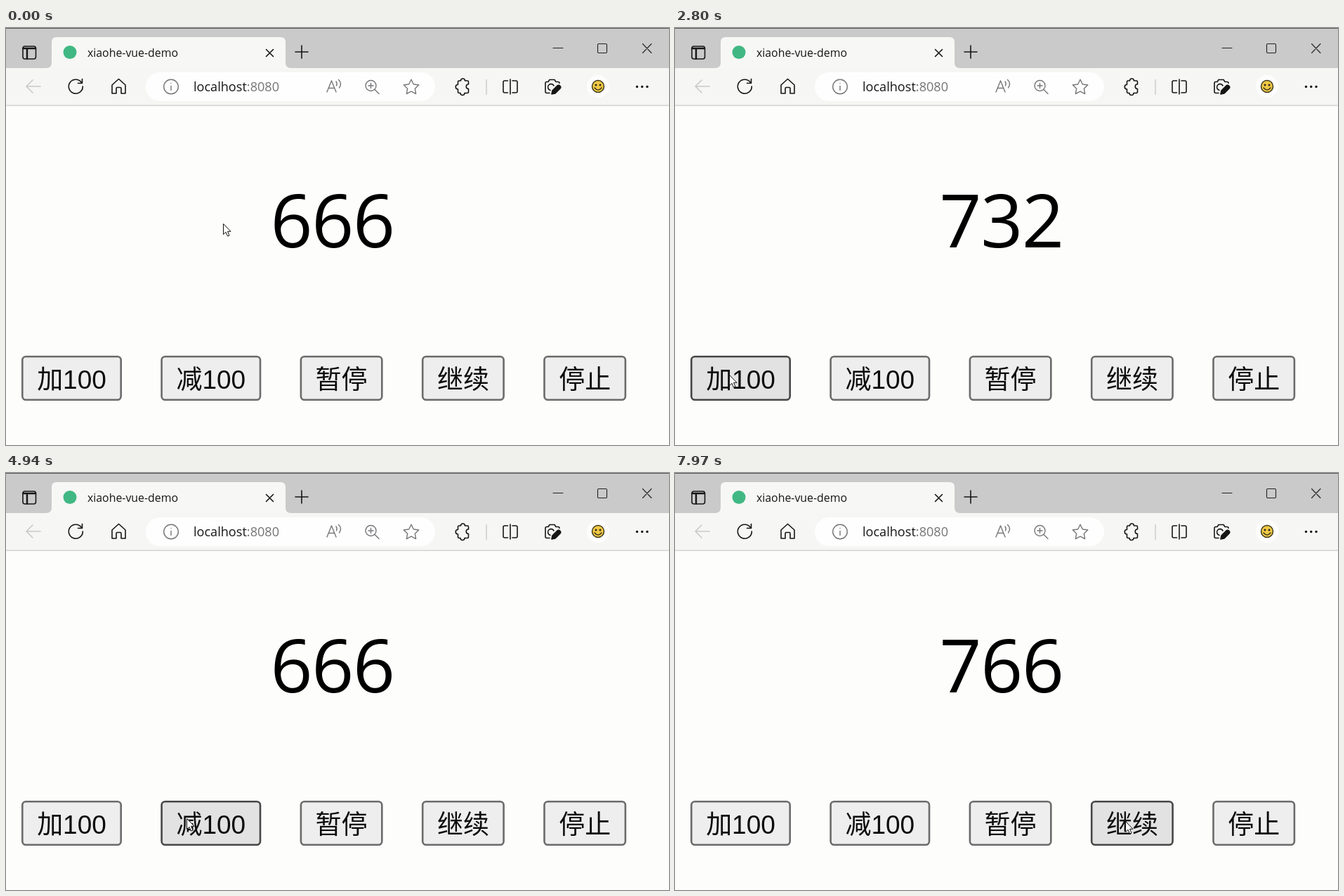
An HTML page that plays this animation: 944x593 px, repeating every 8 s.

```html
<!DOCTYPE html>
<html lang="zh">
<head>
<meta charset="utf-8">
<title>xiaohe-vue-demo</title>
<style>
  html, body { margin: 0; width: 100%; height: 100%; overflow: hidden; background: #fdfdfc; }
  svg { display: block; width: 944px; height: 593px; }
  .ui { font-family: "Open Sans", "Noto Sans", sans-serif; }
  .icon { fill: none; stroke: #161616; stroke-width: 1.6; stroke-linecap: round; stroke-linejoin: round; }
  .soft { stroke: #77777a; stroke-width: 1.4; }
  .thin { stroke-width: 1.1; stroke: #222; }
  .button rect { fill: #eeeeee; stroke: #6b6b6b; stroke-width: 2.6; }
  .button text { font: 37px "Liberation Sans", "Noto Sans CJK SC", "Noto Sans CJK", sans-serif; text-anchor: middle; fill: #0c0c0c; }
  .button.hover rect { fill: #e2e2e2; stroke: #474747; }
  #count { font-size: 105px; letter-spacing: -1.3px; }
</style>
</head>
<body>
<svg viewBox="0 0 944 593">
  <rect width="944" height="593" fill="#fdfdfc"/>

  <!-- title bar and tab -->
  <rect width="944" height="58" fill="#cacaca"/>
  <rect width="944" height="1" fill="#555559"/>
  <rect y="57" width="944" height="53" fill="#f6f6f4"/>
  <path d="M57 57Q65 57 65 49V20Q65 13 72 13H391Q398 13 398 20V49Q398 57 406 57Z" fill="#f7f7f5"/>
  <rect y="109.5" width="944" height="1.3" fill="#cfcfcf"/>
  <g class="icon">
    <rect x="24" y="26" width="18.5" height="18" rx="3"/>
    <path d="M24.5 29H42M30 30V43.5" stroke-width="2.4"/>
    <path d="M370.5 30.5L380.5 40.5M380.5 30.5L370.5 40.5M412 34H430M421 25V43"/>
  </g>
  <g class="icon thin">
    <path d="M779 28.5H793M906.5 22.5L919 35.5M919 22.5L906.5 35.5"/>
    <rect x="842.5" y="22.5" width="13" height="13" rx="1.5"/>
  </g>
  <circle cx="91" cy="34.5" r="9.5" fill="#41b883"/>
  <text class="ui" x="116" y="40.5" font-size="15.85" fill="#161616">xiaohe-vue-demo</text>

  <!-- toolbar -->
  <rect x="199" y="63" width="412" height="41" rx="20.5" fill="#fefefe"/>
  <g class="icon">
    <path d="M49 83H29M38 74L29 83L38 92" stroke="#c9c9c9"/>
    <path d="M107.5 77.5A10 10 0 1 0 109.3 83M108.5 72.5V78.5H102.5"/>
    <path d="M151 81L160.5 72.5L170 81V93H164V86Q164 84.5 162.5 84.5H158.5Q157 84.5 157 86V93H151Z"/>
    <path d="M645 75H647.5A3 3 0 0 1 653.5 75H657Q658.500 75 658.5 76.5V80A3 3 0 0 0 658.5 86.5V91Q658.5 92.5 657 92.5H653A3 3 0 0 1 647 92.5H645Q643.5 92.5 643.5 91V87A3 3 0 0 1 643.5 80.5V76.5Q643.5 75 645 75Z"/>
    <path d="M714.5 75H710Q708 75 708 77V90Q708 92 710 92H714.5M721 75H726Q728 75 728 77V90Q728 92 726 92H721M718 73V94"/>
    <path d="M774 92.5H770Q768 92.5 768 90.5V78.5Q768 76.5 770 76.5H772L774 73.5H781L783 76.5H786Q788 76.5 788 78.5M780 82A4.5 4.5 0 1 0 775 88.5"/>
    <path d="M777 94L778 89L785 82Q787 80.5 789 82.5Q790.5 84.5 789 86L782 93Z" fill="#161616"/>
  </g>
  <path d="M684 73V95" stroke="#cdcdcd" stroke-width="1.5"/>
  <g class="icon soft">
    <circle cx="235" cy="83.5" r="10.3"/>
    <path d="M235 82.5V88.5M235 78.5V78.6"/>
    <path d="M457 91L463.5 75L470 91M459.5 85.5H467.5M470 76Q472 79 470.5 82M473.5 73.5Q479 79 474.5 85"/>
    <circle cx="519.5" cy="82" r="7.5"/>
    <path d="M525 87.5L531 93.5M516 82H523M519.5 78.5V85.5"/>
    <path id="star"/>
  </g>
  <circle cx="843" cy="83" r="16" fill="#fdfdfd"/>
  <circle cx="843" cy="83" r="8.5" fill="#f0c944" stroke="#3f3a20" stroke-width="1.5"/>
  <path d="M838 85Q843 91 848 85" fill="none" stroke="#3f3a20" stroke-width="1.6" stroke-linecap="round"/>
  <circle cx="840" cy="81" r="1.5" fill="#30281a"/>
  <circle cx="846" cy="81" r="1.5" fill="#30281a"/>
  <g fill="#161616"><circle cx="898.5" cy="83.5" r="1.7"/><circle cx="905.7" cy="83.5" r="1.7"/><circle cx="913" cy="83.5" r="1.7"/></g>
  <text class="ui" x="267" y="90" font-size="18.1" fill="#161616">localhost<tspan fill="#747474">:8080</tspan></text>

  <!-- page -->
  <text id="count" class="ui" x="376.5" y="311.5" fill="#000">666</text>
  <g id="buttons"></g>
  <path id="cursor" d="M.5 .5V15.5L4 12.3L6.5 18L9 17L6.5 11.3H11Z" fill="#fff" stroke="#111" stroke-width="1" stroke-linejoin="round"/>
</svg>
<script>
const LOOP = 8000;
const byId = id => document.getElementById(id);

const starPoints = Array.from({ length: 10 }, (_, i) => {
  const radius = i % 2 ? 5.6 : 11.3, angle = (i * 36 - 90) * Math.PI / 180;
  return `${577 + radius * Math.cos(angle)} ${84.5 + radius * Math.sin(angle)}`;
});
byId('star').setAttribute('d', `M${starPoints.join('L')}Z`);

const buttons = [
  ['加100', 22, 143], ['减100', 220.3, 143], ['暂停', 418.6, 118], ['继续', 591.9, 118], ['停止', 765.2, 118]
].map(([label, x, width]) => {
  const node = document.createElementNS('http://www.w3.org/2000/svg', 'g');
  node.innerHTML = `<rect x="${x + 1.3}" y="467.3" width="${width - 2.6}" height="61.4" rx="5"/>
    <text x="${x + width / 2}" y="512.5">${label}</text>`;
  byId('buttons').append(node);
  return { node, x, width };
});

// [time, value...]
const counts = [
  [0, 666], [2071, 666], [3171, 766], [3649, 766], [4749, 666],
  [5650, 666], [6486, 742], [7380, 742], [7644, 766], [LOOP, 766]
];
const moves = [
  [0, 309, 278], [600, 309, 278], [1500, 77, 493], [3050, 77, 493], [3500, 268, 496],
  [4300, 268, 496], [4700, 257, 491], [5000, 257, 491], [5480, 80, 495], [5680, 80, 495],
  [5970, 419, 505], [6200, 478, 503], [6640, 478, 503], [7140, 641, 495], [LOOP, 641, 495]
];
const linear = u => u;
const smooth = u => u * u * (3 - 2 * u);

function sample(keys, time, ease) {
  const next = keys.findIndex(key => key[0] > time);
  const from = keys[next - 1], to = keys[next];
  const u = ease((time - from[0]) / (to[0] - from[0]));
  return from.slice(1).map((value, i) => value + (to[i + 1] - value) * u);
}

function draw(now) {
  const time = now % LOOP;
  const [x, y] = sample(moves, time, smooth);
  byId('count').textContent = Math.round(sample(counts, time, linear)[0]);
  byId('cursor').setAttribute('transform', `translate(${Math.round(x)} ${Math.round(y)})`);
  for (const b of buttons) {
    const inside = x > b.x + 1 && x < b.x + b.width && y > 466 && y < 530;
    b.node.setAttribute('class', inside ? 'button hover' : 'button');
  }
}

let start;
function tick(now) {
  start ??= now;
  draw(Math.max(0, now - start));
  requestAnimationFrame(tick);
}
draw(0);
requestAnimationFrame(tick);
</script>
</body>
</html>
```
